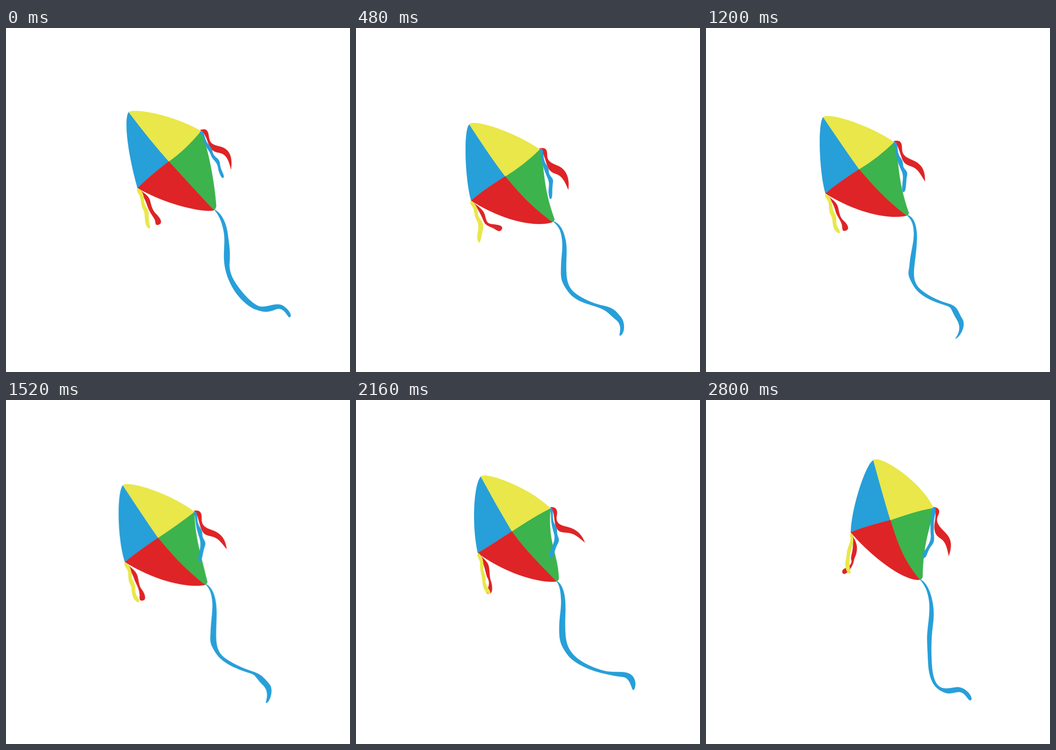
Write an HTML page without scripts that moves like this. It is 748 px wide and 748 px high and loops after 2880 ms.

```html
<!DOCTYPE html>
<html lang="en">
<head>
<meta charset="utf-8">
<title>Kite</title>
<style>
html, body { margin: 0; width: 100%; height: 100%; overflow: hidden; background: #fff; }
svg { display: block; width: 100%; height: 100%; }

.yellow { fill: #e9e74a; stroke: #e9e74a; }
.blue { fill: #279fd9; stroke: #279fd9; }
.green { fill: #3cb34d; stroke: #3cb34d; }
.red { fill: #de2426; stroke: #de2426; }
path { stroke-width: .5; stroke-linejoin: round; }

/* Every pose change runs in 80 ms steps; the base pose is in the markup. */
#kite, path { animation: 2880ms steps(3) infinite; }
#kite { animation-name: drift; }
#top { animation-name: top; }
#left { animation-name: left; }
#right { animation-name: right; }
#bottom { animation-name: bottom; }
#tail { animation-name: tail; }
#right-back { animation-name: right-back; }
#right-front { animation-name: right-front; }
#left-back { animation-name: left-back; }
#left-front { animation-name: left-front; }

@keyframes drift {
  8.3333% { transform: translateX(0); animation-timing-function: steps(3); }
  16.6666% { transform: translateX(-4px); animation-timing-function: steps(3); }
  25% { transform: translateX(0); animation-timing-function: steps(6); }
  41.6666% { transform: translateX(0); animation-timing-function: steps(6); }
  58.3333% { transform: translateX(-2px); animation-timing-function: steps(2); }
  63.8888% { transform: translateX(0); animation-timing-function: steps(4); }
  75% { transform: translateX(-6px); animation-timing-function: steps(4); }
  86.1111% { transform: translateX(0); }
}
@keyframes top {
  8.3333% { d: path("M252 210C260 198 345 226 404 266Q368 301 329 324Q298 285 252 210"); animation-timing-function: steps(6); }
  25% { d: path("M249 209C258 197 345 222 403 262Q367 297 328 321Q298 281 249 209"); animation-timing-function: steps(6); }
  41.6666% { d: path("M255 194C264 183 350 208 409 248Q373 283 333 307Q304 267 255 194"); animation-timing-function: steps(8); }
  63.8888% { d: path("M256 177C266 166 360 194 413 238Q380 257 331 292Q295 239 256 177"); animation-timing-function: steps(8); }
  86.1111% { d: path("M299 156C306 144 400 182 445 233Q415 244 359 279Q325 215 299 156"); animation-timing-function: steps(4); }
  97.2222% { d: path("M364 131C376 118 466 174 495 235Q470 237 401 261Q387 216 364 131"); animation-timing-function: steps(1); }
}
@keyframes left {
  8.3333% { d: path("M252 210Q298 285 329 324Q272 360 255 377C242 330 238 222 252 210"); animation-timing-function: steps(6); }
  25% { d: path("M249 209Q298 281 328 321Q273 356 254 374C240 328 237 220 249 209"); animation-timing-function: steps(6); }
  41.6666% { d: path("M255 194Q304 267 333 307Q279 342 260 360C246 314 243 206 255 194"); animation-timing-function: steps(8); }
  63.8888% { d: path("M256 177Q295 239 331 292Q285 325 260 345C240 288 242 195 256 177"); animation-timing-function: steps(8); }
  86.1111% { d: path("M299 156Q325 215 359 279Q315 305 282 321C274 255 283 170 299 156"); animation-timing-function: steps(4); }
  97.2222% { d: path("M364 131Q387 216 401 261Q335 278 315 288C316 235 348 138 364 131"); animation-timing-function: steps(1); }
}
@keyframes right {
  8.3333% { d: path("M404 266C416 300 408 340 436 416Q437 420 432 423C385 389 360 361 329 324Q368 301 404 266"); animation-timing-function: steps(6); }
  25% { d: path("M403 262C414 300 408 340 435 415Q435 419 430 421C383 386 358 357 328 321Q367 297 403 262"); animation-timing-function: steps(6); }
  41.6666% { d: path("M409 248C421 286 414 326 441 402Q441 406 436 408C389 372 364 343 333 307Q373 283 409 248"); animation-timing-function: steps(8); }
  63.8888% { d: path("M413 238C403 310 434 338 437 388Q437 394 432 396C382 354 360 328 331 292Q380 257 413 238"); animation-timing-function: steps(8); }
  86.1111% { d: path("M445 233C441 308 456 330 457 385Q457 391 452 393C408 338 385 320 359 279Q415 244 445 233"); animation-timing-function: steps(4); }
  97.2222% { d: path("M495 235C490 275 473 300 471 383Q471 389 465 391C428 345 418 315 401 261Q470 237 495 235"); animation-timing-function: steps(1); }
}
@keyframes bottom {
  8.3333% { d: path("M255 377Q272 360 329 324C360 361 385 389 432 423C405 435 335 428 255 377"); animation-timing-function: steps(6); }
  25% { d: path("M254 374Q273 356 328 321C358 357 383 386 430 421C403 429 335 424 254 374"); animation-timing-function: steps(6); }
  41.6666% { d: path("M260 360Q279 342 333 307C364 343 389 372 436 408C410 415 341 410 260 360"); animation-timing-function: steps(8); }
  63.8888% { d: path("M260 345Q285 325 331 292C360 328 382 354 432 396C400 402 330 388 260 345"); animation-timing-function: steps(8); }
  86.1111% { d: path("M282 321Q315 305 359 279C385 320 408 338 452 393C425 396 345 375 282 321"); animation-timing-function: steps(4); }
  97.2222% { d: path("M315 288Q335 278 401 261C418 315 428 345 465 391C425 394 350 330 315 288"); animation-timing-function: steps(1); }
}
@keyframes tail {
  8.3333% { d: path("M432 420C450 425 461 441 467 463S472 498 474 522S481 559 492 572S532 602 553 609S584 615 598 625S611 658 605 662S606 640 586 632S562 623 545 613S498 594 482 573S463 540 463 515S463 483 459 462S449 431 432 420"); animation-timing-function: steps(6); }
  25% { d: path("M430 419C444 423 449 436 452 457S449 502 448 526S448 562 460 573S504 596 527 598S552 612 561 631S563 671 554 675S569 659 554 638S541 609 522 604S467 600 449 574S436 545 437 523S446 477 445 457S440 430 430 419"); animation-timing-function: steps(6); }
  41.6666% { d: path("M436 406C450 409 456 424 458 443S456 492 453 517S453 556 466 568S504 593 526 599S547 616 557 632S551 672 544 675S561 660 546 635S536 608 521 603S466 587 451 560S441 535 443 512S453 464 452 444S446 416 436 406"); animation-timing-function: steps(8); }
  63.8888% { d: path("M432 393C446 400 455 421 458 444S460 478 463 504S472 543 487 553S528 574 547 581S579 594 590 602S600 638 593 642S596 617 575 606S557 589 540 584S482 564 466 543S450 515 450 490S450 452 448 433S441 401 432 393"); animation-timing-function: steps(4); }
  75% { d: path("M441 393C454 398 460 419 461 440S460 478 461 503S467 542 482 557S526 584 546 589S588 588 602 596S615 625 610 630S605 604 586 602S560 598 542 594S482 576 466 554S448 522 448 497S453 453 452 434S449 402 441 393"); animation-timing-function: steps(4); }
  86.1111% { d: path("M450 392C461 396 464 417 464 436S458 478 456 502S454 541 469 560S510 594 531 595S565 583 582 590S603 613 597 616S588 593 569 598S546 605 528 602S477 584 461 563S443 530 445 503S456 454 457 434S457 402 450 392"); animation-timing-function: steps(4); }
  97.2222% { d: path("M464 389C480 396 489 418 493 442S494 482 492 500S489 545 491 575S500 625 518 627S545 620 560 628S581 652 575 653S563 632 547 635S526 640 514 634S485 617 483 570S480 520 482 500S488 457 485 436S476 402 464 389"); animation-timing-function: steps(1); }
}
@keyframes right-back {
  8.3333% { d: path("M403 264C417 261 420 266 420 278S428 295 443 301S470 323 467 353C459 333 452 323 440 319S423 309 419 297S411 268 403 264"); animation-timing-function: steps(6); }
  25% { d: path("M402 260C416 257 419 262 419 275S427 292 442 298S469 320 464 350C457 331 450 319 437 315S422 306 418 293S411 266 402 260"); animation-timing-function: steps(6); }
  41.6666% { d: path("M408 246C422 243 426 248 426 262S434 281 448 287S477 302 476 333C465 316 461 306 447 301S430 294 425 280S417 252 408 246"); animation-timing-function: steps(8); }
  63.8888% { d: path("M412 236C424 235 428 241 427 253S430 273 445 277S478 287 486 315C472 302 466 294 450 292S431 289 426 278S422 244 412 236"); animation-timing-function: steps(8); }
  86.1111% { d: path("M445 230C457 229 462 236 458 249S460 269 474 272S508 278 521 304C503 292 498 286 481 285S461 284 456 273S456 240 445 230"); animation-timing-function: steps(4); }
  97.2222% { d: path("M494 233C505 233 510 240 505 250S501 268 513 281S540 303 528 339C524 320 521 308 510 301S496 286 497 272S503 245 494 233"); animation-timing-function: steps(1); }
}
@keyframes right-front {
  8.3333% { d: path("M403 267C413 259 411 275 414 288S424 301 424 313S435 326 433 338S433 368 430 373S423 362 425 348S421 328 418 319S410 300 408 287S406 273 403 267"); animation-timing-function: steps(6); }
  25% { d: path("M402 263C412 256 409 273 412 285S421 297 422 310S434 323 431 335S431 365 427 369S420 360 422 345S419 324 416 316S409 298 407 283S405 270 402 263"); animation-timing-function: steps(6); }
  41.6666% { d: path("M407 250C417 242 415 260 418 272S428 284 428 296S440 309 437 321S436 352 431 356S426 348 428 333S426 312 422 303S415 285 413 271S411 258 407 250"); animation-timing-function: steps(8); }
  63.8888% { d: path("M411 240C419 232 417 252 419 262S428 276 428 288S436 304 430 315S421 343 416 346S412 338 416 328S424 306 422 296S416 276 415 262S415 248 411 240"); animation-timing-function: steps(8); }
  86.1111% { d: path("M443 234C451 226 450 245 450 258S459 270 458 283S466 299 459 310S452 337 446 339S439 335 444 323S455 302 453 292S446 272 446 258S446 242 443 234"); animation-timing-function: steps(4); }
  97.2222% { d: path("M491 236C501 229 500 240 497 253S496 268 495 282S500 305 490 317S481 341 475 343S469 337 476 327S490 305 489 294S488 272 489 258S493 244 491 236"); animation-timing-function: steps(1); }
}
@keyframes left-back {
  8.3333% { d: path("M256 375C266 388 282 394 286 407S290 426 301 427S327 427 325 434S317 441 308 435S289 432 285 423S272 394 256 375"); animation-timing-function: steps(6); }
  25% { d: path("M254 373C264 386 277 390 281 403S284 424 297 426S320 431 318 438S312 445 305 440S284 430 280 420S269 392 254 373"); animation-timing-function: steps(6); }
  41.6666% { d: path("M260 358C270 372 284 377 287 390S291 412 299 419S313 437 305 440S297 440 296 430S284 408 282 399S274 374 260 358"); animation-timing-function: steps(8); }
  63.8888% { d: path("M260 343C270 357 283 362 287 375S289 396 293 404S302 430 295 431S286 429 288 421S292 404 286 397S275 365 260 343"); animation-timing-function: steps(8); }
  86.1111% { d: path("M283 319C291 333 303 337 303 352S303 374 305 382S307 410 298 411S291 408 296 402S302 386 299 378S298 347 283 319"); animation-timing-function: steps(4); }
  97.2222% { d: path("M315 286C320 301 329 309 328 324S323 340 321 351S307 378 301 378S294 369 303 366S319 354 316 347S327 317 315 286"); animation-timing-function: steps(1); }
}
@keyframes left-front {
  8.3333% { d: path("M255 377C265 382 270 396 270 405S285 423 283 435S279 457 277 465S269 464 271 449S273 428 268 419S263 404 261 396S251 386 255 377"); animation-timing-function: steps(6); }
  25% { d: path("M253 374C264 379 268 393 268 402S280 421 278 433S273 455 271 462S263 461 266 446S270 427 265 417S261 402 259 393S249 382 253 374"); animation-timing-function: steps(6); }
  41.6666% { d: path("M260 360C271 365 274 379 275 390S284 405 283 418S290 437 291 443S284 446 279 437S277 416 272 408S268 390 267 381S256 369 260 360"); animation-timing-function: steps(8); }
  63.8888% { d: path("M260 345C271 350 274 364 274 375S282 390 281 403S290 424 291 430S281 433 277 421S276 402 271 394S268 376 267 368S256 355 260 345"); animation-timing-function: steps(8); }
  86.1111% { d: path("M283 320C292 327 293 342 291 352S295 367 294 379S304 400 305 406S299 411 293 403S288 383 288 373S283 352 285 343S279 330 283 320"); animation-timing-function: steps(4); }
  97.2222% { d: path("M315 289C323 296 320 312 317 321S313 335 312 347S313 368 314 374S307 379 304 365S306 346 306 336S312 314 314 306S311 297 315 289"); animation-timing-function: steps(1); }
}
</style>
</head>
<body>
<svg viewBox="0 0 748 748" xmlns="http://www.w3.org/2000/svg">
  <g id="kite">
    <path id="tail" class="blue" d="M452 394C469 402 479 424 482 447S488 485 486 510S498 553 505 563S538 605 555 606S590 595 604 605S622 627 617 629S606 604 586 612S558 617 543 612S506 588 493 565S474 520 474 497S477 460 473 440S463 407 452 394"/>
    <path id="left" class="blue" d="M267 183Q312 243 354 290Q312 322 286 348C260 255 258 192 267 183"/>
    <path id="right" class="green" d="M424 224C440 262 454 340 457 386Q457 393 452 396C425 368 390 329 354 290Q388 267 424 224"/>
    <path id="bottom" class="red" d="M286 348Q312 322 354 290C390 329 425 368 452 396C440 402 360 390 286 348"/>
    <path id="top" class="yellow" d="M267 183C275 174 360 187 424 224Q388 267 354 290Q312 243 267 183"/>
    <path id="right-back" class="red" d="M422 222C435 218 439 221 441 236S449 254 466 258S494 277 489 307C483 280 475 273 462 271S444 262 439 248S430 226 422 222"/>
    <path id="right-front" class="blue" d="M421 227C430 219 430 232 434 243S447 256 449 269S464 281 465 295S476 320 473 325S463 316 461 303S449 287 446 277S433 259 431 246S425 231 421 227"/>
    <path id="left-back" class="red" d="M286 346C296 358 310 363 313 375S318 396 326 404S342 423 333 427S326 424 324 418S313 402 309 391S300 364 286 346"/>
    <path id="left-front" class="yellow" d="M286 348C297 352 300 365 300 376S310 392 310 403S311 425 313 432S305 436 303 422S303 404 298 394S294 374 291 366S283 356 286 348"/>
  </g>
</svg>
</body>
</html>
```
